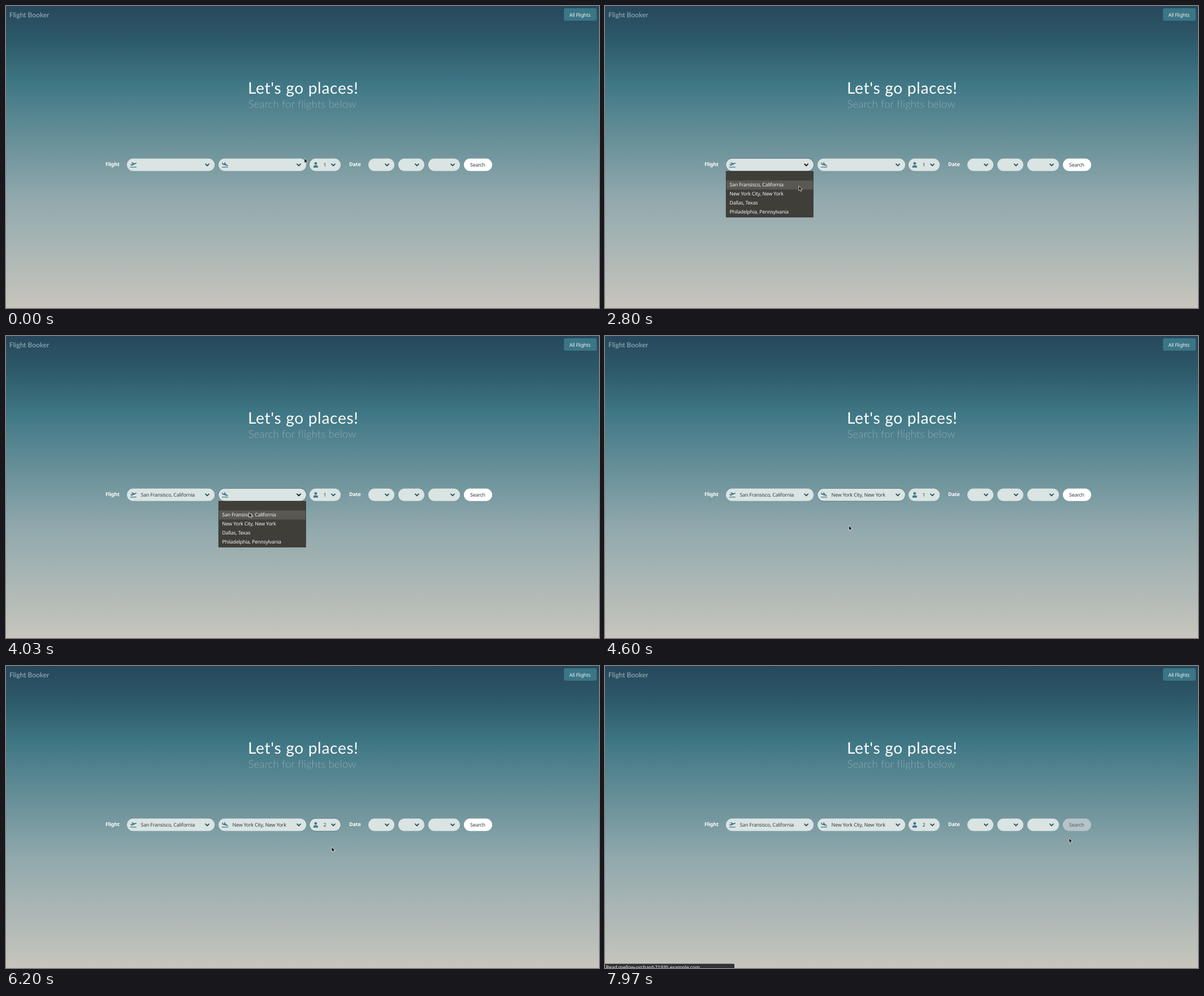
An HTML page that plays this animation: 1049 by 534 pixels, repeating every 8000 ms.

```html
<!DOCTYPE html>
<html lang="en">
<head>
<meta charset="utf-8">
<title>Flight search</title>
<style>
  html, body { margin: 0; width: 100%; height: 100%; overflow: hidden; }
  body { background: linear-gradient(#27485c, #2c5969 60px, #3f7785 136px, #91a9ad 340px, #c7c5bd); }
  svg { display: block; }
  text { font: 8.8px "Noto Sans", "Open Sans", sans-serif; letter-spacing: -.2px; fill: #343d40;
    white-space: pre; text-rendering: geometricPrecision; }
  .light { fill: #f2f4f4; }
  .label { font-weight: 700; font-size: 9px; fill: #fff; }
  .brand { font: 400 12px Lato, sans-serif; letter-spacing: 0; fill: #9db5bb; }
  .title { font: 400 28px Lato, sans-serif; letter-spacing: .72px; fill: #fff; }
  .sub { font: 300 18.7px Lato, sans-serif; letter-spacing: .08px; fill: #8daab0; }
</style>
</head>
<body>
<svg width="1049" height="534" viewBox="0 0 1049 534">
  <text class="brand" x="6" y="19.5">Flight Booker</text>
  <rect x="987" y="4" width="58" height="22" rx="3" fill="#3b7686"/>
  <text class="light" x="996.5" y="19">All Flights</text>
  <text class="title" x="428" y="154.5">Let's go places!</text>
  <text class="sub" x="428.5" y="179.5">Search for flights below</text>
  <text class="label" x="176" y="283">Flight</text>
  <text class="label" x="607" y="283">Date</text>
  <g id="live"></g>
</svg>
<script>
const LOOP = 8000, TOP = 269.7, HEIGHT = 22.1, MENU_TOP = 292, ROW = 16;
const SUBMIT = 7600, LOADED = 7930;
const HOST = "mellow-orchard-71935.example.com";
const cities = ["", "San Fransisco, California", "New York City, New York", "Dallas, Texas", "Philadelphia, Pennsylvania"];

const icons = {
  depart: `<path d="M.4 3.8L1.8 3.3 3.2 4.3 5 3.5 2.2 1 3.8.5 8 2.2 10 1.3Q11.6.8 11.7 1.8 11.6 2.6 10.5 3.1L3.3 6.3Q2.6 6.6 2.1 6ZM.3 8.2h11v1.2H.3z"/>`,
  arrive: `<path d="M.8.6L2 .9 2.8 2.7 4.9 3.3 4.6.2 6 .6 8.2 4.2 10.3 4.9Q11.8 5.5 11.4 6.4 11 7 9.9 6.7L2.2 4.6Q1.2 4.2 1.1 3.4ZM.5 8.2h11v1.2H.5z"/>`,
  person: `<g transform="translate(1 0)"><circle cx="4.4" cy="2.4" r="2.4"/><path d="M.3 9.8v-1q0-3 2.7-3h2.8q2.7 0 2.7 3v1z"/></g>`
};

// a menu opens at "open"; option number "pick" is chosen at "close"
const selects = [
  { x: 214, w: 155, icon: "depart", options: cities, pick: 1, open: 2130, close: 3270 },
  { x: 376, w: 155, icon: "arrive", options: cities, pick: 2, open: 3870, close: 4600 },
  { x: 537, w: 55, icon: "person", options: ["1", "2", "3", "4"], pick: 1, open: 5530, close: 6200 },
  { x: 641, w: 46 }, { x: 694, w: 46 }, { x: 747, w: 56 }
];
const search = { x: 810, w: 50 };

// pointer moves: start time, end time, destination
const start = { x: 527.5, y: 269 };
const moves = [
  [600, 1000, 523, 272], [1200, 2000, 342.5, 288], [2500, 2800, 342.5, 318], [3270, 3750, 430, 286],
  [3870, 4030, 429.5, 312], [4100, 4330, 431, 335], [4930, 5100, 579.5, 279], [5600, 5930, 575.5, 320],
  [6200, 6730, 650, 285], [6930, 7330, 824.5, 280], [7930, 7970, 820.5, 304]
];

function pointerAt(t) {
  let { x, y } = start;
  for (const [t0, t1, toX, toY] of moves) {
    const k = Math.min(1, Math.max(0, (t - t0) / (t1 - t0)));
    const eased = 1 - (1 - k) ** 1.6;
    x += (toX - x) * eased;
    y += (toY - y) * eased;
  }
  return { x, y };
}

const isOpen = (s, t) => t >= s.open && t < s.close;
const isOver = (s, p) => p.x >= s.x && p.x <= s.x + s.w && p.y >= TOP && p.y <= TOP + HEIGHT;
const label = (x, y, str, cls = "") => `<text class="${cls}" x="${x}" y="${y}">${str}</text>`;
const pill = (s, style) => `<rect x="${s.x}" y="${TOP}" width="${s.w}" height="${HEIGHT}" rx="11" ${style}/>`;

function drawSelect(s, t, pointer, focused) {
  const dark = isOpen(s, t) || isOver(s, pointer);
  let out = s === focused ? pill(s, `stroke="#2d5264" stroke-opacity=".65" stroke-width="1.2"`) : "";
  out += pill(s, `fill="#dae4e3"`);
  if (s.icon) {
    out += `<g transform="translate(${s.x + 5.4} 276)" fill="#3d7888">${icons[s.icon]}</g>`;
    out += label(s.x + 24.6, 284, s.options[t >= s.close ? s.pick : 0]);
  }
  return out + `<path d="M${s.x + s.w - 16} 279.4l3 3 3-3" fill="none" stroke-width="1.9"
    stroke-linecap="round" stroke="${dark ? "#101416" : "#28505f"}"/>`;
}

function drawMenu(s, pointerY) {
  const active = Math.max(0, Math.floor((pointerY - MENU_TOP - .5) / ROW));
  return `<rect x="${s.x + .2}" y="${MENU_TOP + .2}" width="${s.w - 1}" height="${s.options.length * ROW + 1}"
      fill="#3f3e39" stroke="#2c2b28" stroke-width=".8"/>
    <rect x="${s.x + .6}" y="${MENU_TOP + .5 + active * ROW}" width="${s.w - 1.8}" height="${ROW}" fill="#595853"/>` +
    s.options.map((o, i) => label(s.x + 6.3, MENU_TOP + 11.3 + i * ROW, o, "light")).join("");
}

function drawSearch(t, pointer) {
  const sent = t >= SUBMIT;
  const fill = sent ? "#b5c4c8" : isOver(search, pointer) ? "#e3e9eb" : "#fff";
  return pill(search, `fill="${fill}"`) + `<g opacity="${sent ? .75 : 1}">${label(821, 284, "Search")}</g>`;
}

function drawStatus(t) {
  if (t < SUBMIT) return "";
  const str = t < LOADED ? `Transferring data from ${HOST}…` : `Read ${HOST}`;
  return `<path d="M0 526.5H227q2 0 2 2V534H0z" fill="#323234"/>` + label(1.5, 535.7, str, "light");
}

function drawPointer({ x, y }, hand) {
  const shape = hand
    ? `<path d="M-1 .8q1-1.6 2 0v3.4l3.2.8q1 .4 1 1.4v2l-.9 2.3h-4.2l-2.8-3.6q-.5-1 .4-1.2l1.3.8z" fill="#fff" stroke="#111" stroke-width=".9"/>`
    : `<path d="M.3.3V8.7L2.3 6.9 3.7 9.9 5.2 9.2 3.8 6.2H6.6Z" fill="#111" stroke="#fff" stroke-width=".7"/>`;
  return `<g transform="translate(${x} ${y})" stroke-linejoin="round">${shape}</g>`;
}

const live = document.getElementById("live");
function frame() {
  const t = performance.now() % LOOP, pointer = pointerAt(t);
  const menu = selects.find(s => isOpen(s, t));
  const focused = t < SUBMIT && selects.findLast(s => t >= s.open);
  const hand = !menu && [...selects, search].some(s => isOver(s, pointer));
  live.innerHTML = selects.map(s => drawSelect(s, t, pointer, focused)).join("") +
    drawSearch(t, pointer) + drawStatus(t) +
    (menu ? drawMenu(menu, pointer.y) : "") + drawPointer(pointer, hand);
  requestAnimationFrame(frame);
}
frame();
</script>
</body>
</html>
```
